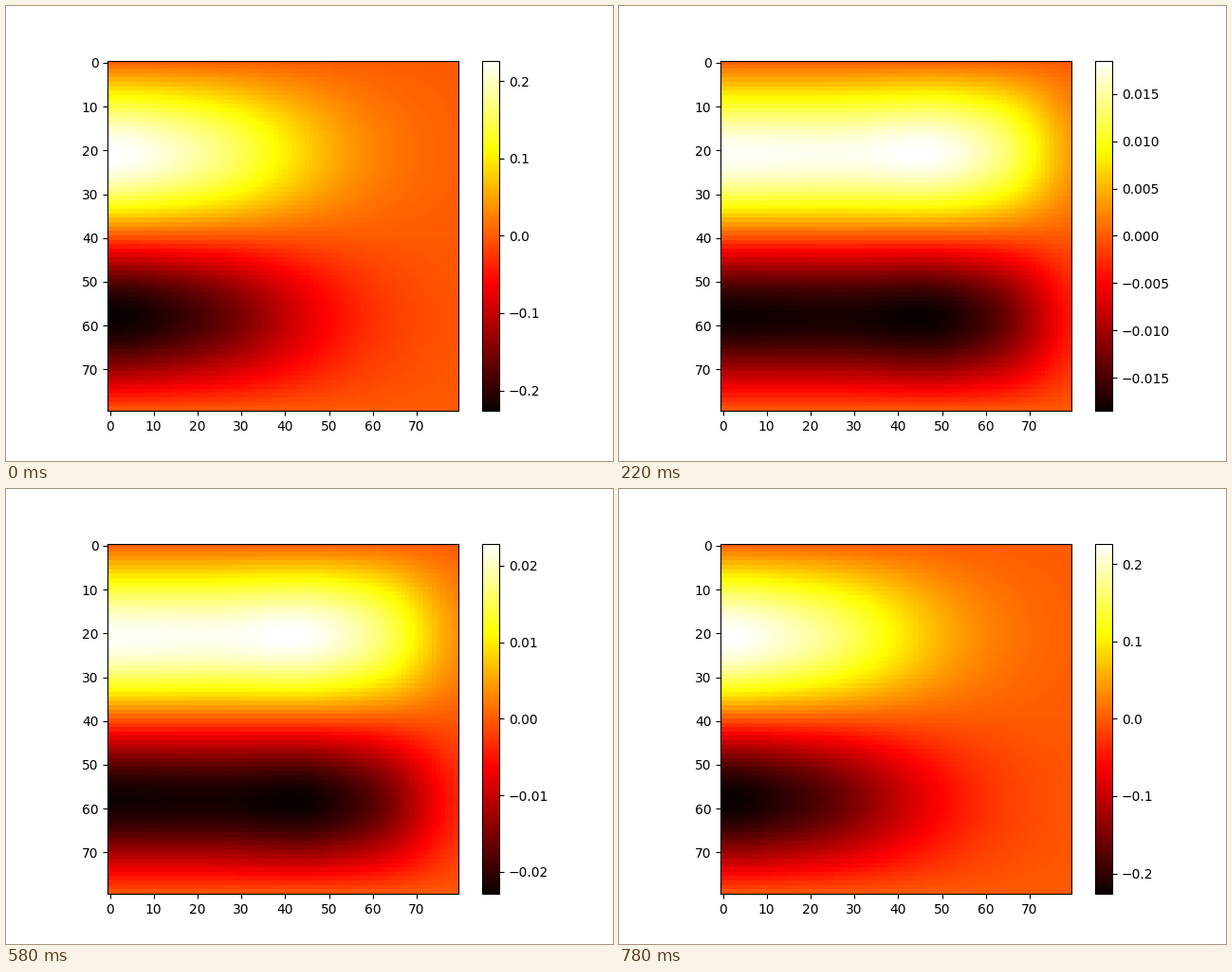
Recreate the animation shown at these times as a matplotlib script. Size 640x480 px, loop 800 ms.

```python
import numpy as np
import matplotlib.pyplot as plt
from matplotlib.animation import FuncAnimation

SIZE = 80
FRAMES = 40
INTERVAL = 20

x = np.arange(SIZE)
theta = 2 * np.pi * (np.arange(SIZE)[:, None] + 0.5) / SIZE
left = np.cos(np.pi * x / (2 * SIZE)) ** 2

# Undamped amplitude: near-exponential along x, falling faster at the far end.
amplitude = np.exp(0.1 - 0.054 * x - 1.3 * (x / (SIZE - 1)) ** 5)


def peak(t):
    """Largest field value at step t: exponential decay with a fading wobble."""
    wobble = 1 - np.exp(-t / 5.8) * np.cos(0.47 * t)
    return 0.2265 * np.exp(-0.2185 * t - 0.107 * wobble)


def profile(t):
    """Plateau with a slightly raised front that moves right."""
    ratio = amplitude / peak(t)
    offset = np.log(ratio / 4.3)
    width = np.where(offset < 0, 0.6, 0.8)
    bump = 0.075 * np.exp(-(offset / width) ** 2)
    swing = 0.035 * np.sin(np.pi * (t / 17) ** 2)
    rise = swing * np.cos(np.pi * np.minimum(x / 70, 0.5)) ** 2
    return ratio / np.sqrt(1 + ratio ** 2) + bump + rise


def cross_section(t):
    """Skewed sine along y; its outer edges flatten late on the left."""
    corner = (t / 18) ** 5 * left ** 0.75
    skew = 0.04 + 0.03 * left + 0.13 * corner
    pinch = 0.025 + 0.145 * corner
    wave = np.sin(theta) - skew * np.sin(2 * theta) - pinch * np.sin(3 * theta)
    return wave / wave.max(axis=0)


def field(t):
    u = cross_section(t) * profile(t)
    return u * peak(t) / u.max()


fig, ax = plt.subplots(figsize=(6.4, 4.8), dpi=100)
image = ax.imshow(field(0), cmap="hot")
fig.colorbar(image, ax=ax)


def update(frame):
    t = min(frame, FRAMES - 1 - frame)
    image.set_data(field(t))
    image.set_clim(-peak(t), peak(t))
    return [image]


anim = FuncAnimation(fig, update, frames=FRAMES, interval=INTERVAL,
                     repeat=True, repeat_delay=0, blit=False)
plt.show()
```
